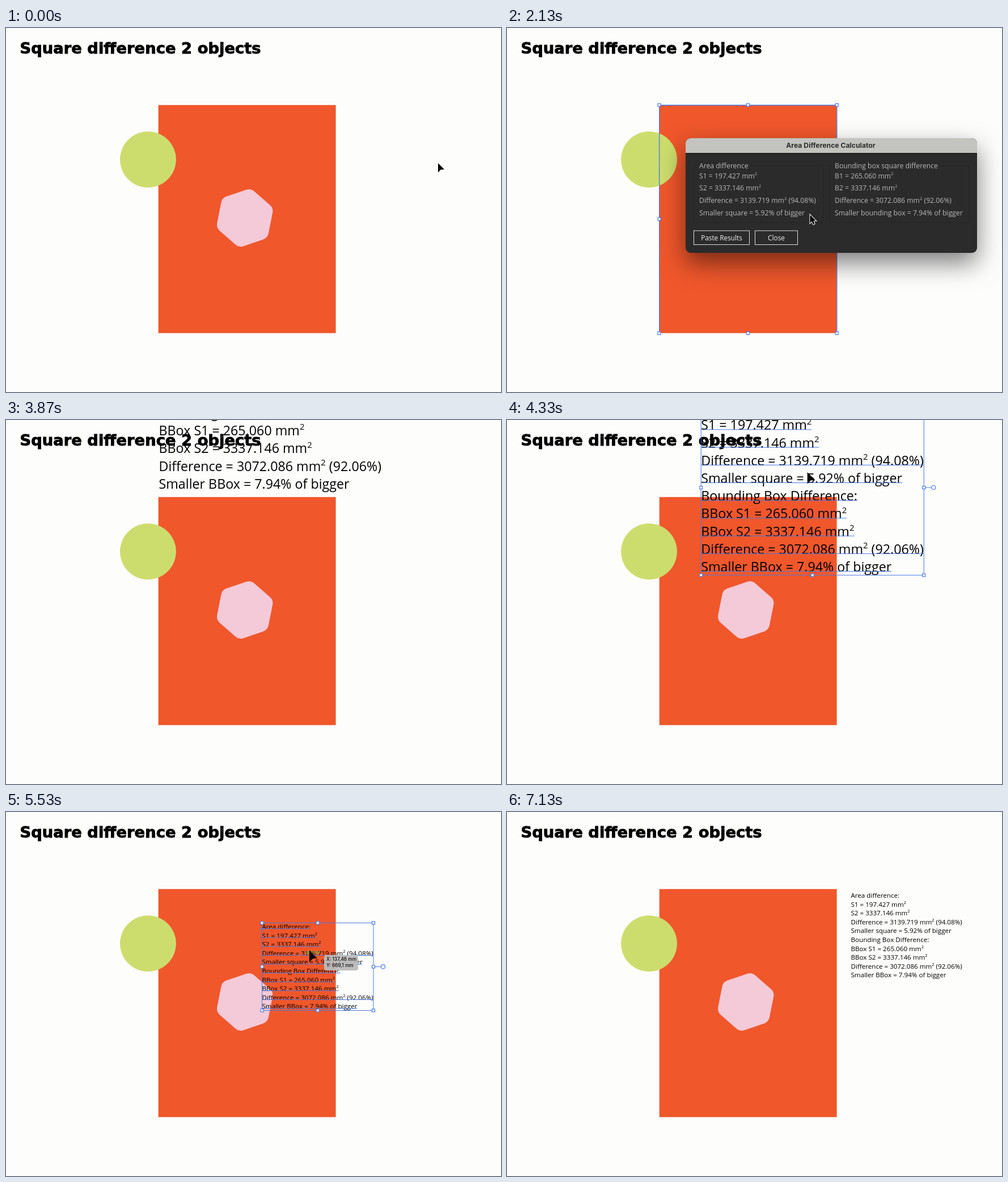
Recreate the animation shown at these times as an HTML page with a canvas. Size 873x641 px, loop 7270 ms.

```html
<!DOCTYPE html>
<html lang="en">
<head>
<meta charset="utf-8">
<title>Square difference 2 objects</title>
<style>
html, body { margin: 0; width: 100%; height: 100%; overflow: hidden; background: #fdfdfc; }
canvas { display: block; }
</style>
</head>
<body>
<canvas id="stage" width="873" height="641"></canvas>
<script>
const g = document.getElementById('stage').getContext('2d');
const LOOP = 7270, FPS = 15;
const BLUE = '#4a7ae6';
const BODY = '"Open Sans", "Noto Sans", sans-serif';
const UI = 'Inter, Roboto, sans-serif';

// pointer keys: time, x, y
const PATH = [
  [70, 762, 239], [470, 595, 529], [670, 595, 529], [1000, 415, 345],
  [1200, 415, 345], [1500, 640, 42], [1870, 742, 172], [1930, 742, 172],
  [2130, 534, 329], [2600, 402, 364], [3330, 402, 364], [3680, 682, 230],
  [3840, 600, -30], [4130, 457, -53], [4600, 639, 313], [4870, 639, 313],
  [5500, 535, 245], [5600, 535, 245], [6260, 690, 190]
];

const AREA = ['S1 = 197.427 mm²', 'S2 = 3337.146 mm²',
  'Difference = 3139.719 mm² (94.08%)', 'Smaller square = 5.92% of bigger'];
const BOUNDS = ['1 = 265.060 mm²', '2 = 3337.146 mm²', 'Difference = 3072.086 mm² (92.06%)'];
const REPORT = ['Area difference:', ...AREA, 'Bounding Box Difference:',
  'BBox S' + BOUNDS[0], 'BBox S' + BOUNDS[1], BOUNDS[2], 'Smaller BBox = 7.94% of bigger'];

const within = (t, a, b) => t >= a && t < b;

function pointer(t) {
  const i = PATH.findIndex(k => k[0] > t);
  if (i === 0) return PATH[0].slice(1);
  if (i < 0) return PATH[PATH.length - 1].slice(1);
  const [t0, x0, y0] = PATH[i - 1], [t1, x1, y1] = PATH[i];
  const p = (t - t0) / (t1 - t0), e = p * p * (3 - 2 * p);
  return [x0 + (x1 - x0) * e, y0 + (y1 - y0) * e];
}

function write(s, x, y, font, color, align = 'left') {
  g.font = font;
  g.fillStyle = color;
  g.textAlign = align;
  g.fillText(s, x, y);
}

// writes body text with a raised "²" and returns its width
function measureRow(s, x, y, size, color) {
  let end = x;
  for (const part of s.split(/(²)/)) {
    const raised = part === '²';
    write(raised ? '2' : part, end, y - (raised ? .42 * size : 0),
      `${raised ? .64 * size : size}px ${BODY}`, color);
    end += g.measureText(raised ? '2' : part).width;
  }
  return end - x;
}

function line(...pts) {
  g.beginPath();
  pts.forEach(([x, y]) => g.lineTo(x, y));
  g.stroke();
}

function pen(color, width = 1) {
  g.strokeStyle = color;
  g.lineWidth = width;
}

function panel(x, y, w, h, r, fill) {
  g.beginPath();
  g.roundRect(x, y, w, h, r);
  g.fillStyle = fill;
  g.fill();
}

function handles(x, y, w, h) {
  pen(BLUE, 1.2);
  g.fillStyle = '#fff';
  for (const i of [0, .5, 1]) for (const j of [0, .5, 1]) {
    if (i === .5 && j === .5) continue;
    const box = [x + w * i - 2.5, y + h * j - 2.5, 5, 5];
    g.fillRect(...box);
    g.strokeRect(...box);
  }
}

function hexagon() {
  const at = k => {
    const a = (-78.7 + 60 * k) * Math.PI / 180;
    return [421.2 + 53.4 * Math.cos(a), 334.5 + 53.4 * Math.sin(a)];
  };
  const [p, q] = [at(0), at(5)];
  g.beginPath();
  g.moveTo((p[0] + q[0]) / 2, (p[1] + q[1]) / 2);
  for (let k = 0; k < 6; k++) g.arcTo(...at(k), ...at(k + 1), 14.5);
  g.closePath();
}

function artwork(selected) {
  g.fillStyle = '#f0572b';
  g.fillRect(268.7, 135.7, 312.9, 401.6);
  g.fillStyle = '#cddd6d';
  g.beginPath();
  g.arc(250.5, 231.6, 49.4, 0, 7);
  g.fill();
  hexagon();
  g.fillStyle = '#f4c9d8';
  g.fill();
  if (!selected) return;
  pen(BLUE, 1.3);
  g.stroke();
  line([268.7, 537], [268.7, 136], [581.8, 136], [581.8, 537]);
  handles(268.5, 135.5, 313.3, 402);
}

function title() {
  const s = 'Square difference 2 objects';
  write(s, 24.4, 45.3, '700 27.4px "DejaVu Sans", sans-serif', '#000');
  pen('#000', .9);
  g.strokeText(s, 24.4, 45.3);
}

function report(x, y, s, selected) {
  REPORT.forEach((row, i) => {
    const base = y + i * 31.2 * s;
    const width = measureRow(row, x, base, 23.24 * s, '#000');
    if (!selected) return;
    pen(BLUE);
    line([x, base - .5], [x + width, base - .5]);
  });
  if (!selected) return;
  const top = y - 21.5 * s, w = 393 * s, h = 308.5 * s, mid = top + h / 2;
  pen(BLUE);
  g.strokeRect(x, top, w, h);
  line([x + w, mid], [x + w + 13.5, mid]);
  handles(x, top, w, h);
  g.fillStyle = BLUE;
  g.fillRect(x - 2, y - 2, 4, 4);
  g.beginPath();
  g.arc(x + w + 17, mid, 3.5, 0, 7);
  g.fillStyle = '#fff';
  g.fill();
  g.stroke();
}

function group(x, w, label, rows) {
  const size = 12.2, ink = '#b9b9b9';
  pen('#232323');
  g.strokeRect(x + .5, 242.5, w, 100);
  g.font = `${size}px ${BODY}`;
  g.fillStyle = '#2b2b2b';
  g.fillRect(x + 6, 238, g.measureText(label).width + 8, 8);
  measureRow(label, x + 10, 246.5, size, ink);
  rows.forEach((row, i) => measureRow(row, x + 10, 264.5 + i * 21.7, size, ink));
}

function button(x, w, label, pressed) {
  if (pressed) {
    g.fillStyle = '#3b96f2';
    g.fillRect(x, 356.5, w, 25.5);
  } else {
    pen('#dedede');
    g.strokeRect(x + .5, 357, w - 1, 24.5);
  }
  write(label, x + w / 2, 374, `11.8px ${BODY}`, '#f2f2f2', 'center');
}

function dialog(pressed) {
  g.save();
  g.shadowColor = 'rgba(0,0,0,.5)';
  g.shadowBlur = 44;
  g.shadowOffsetY = 18;
  panel(315, 194, 514, 202, 9, '#2b2b2b');
  g.restore();
  panel(315, 194, 514, 26, [9, 9, 0, 0], '#c3c4bf');
  g.fillStyle = '#111';
  g.fillRect(315, 220, 514, 1);
  write('Area Difference Calculator', 571, 211.3, `700 12.2px ${UI}`, '#2d2d2d', 'center');
  group(329, 228, 'Area difference', AREA);
  group(568, 246, 'Bounding box square difference',
    ['B' + BOUNDS[0], 'B' + BOUNDS[1], BOUNDS[2], 'Smaller bounding box = 7.94% of bigger']);
  button(329, 99, 'Paste Results', pressed);
  button(437, 76, 'Close', false);
}

function hint(x, y, mmX, mmY) {
  const font = `500 8.3px ${UI}`;
  write('anchor', x + 5, y + 1, `8px ${UI}`, '#45d445');
  panel(x + 38, y + 3, 60, 27, 4, 'rgba(188,188,188,.95)');
  write(`X: ${mmX} mm`, x + 42, y + 13.3, font, '#111');
  write(`Y: ${mmY} mm`, x + 42, y + 24.3, font, '#111');
}

function shape(x, y, s, pts) {
  g.beginPath();
  pts.forEach(([a, b]) => g.lineTo(x + a * s, y + b * s));
  g.closePath();
}

function arrow(x, y, s) {
  shape(x, y, s, [[0, -1], [0, 15.5], [4.6, 10.6], [11, 10]]);
  g.fillStyle = '#000';
  g.fill();
}

function systemArrow(x, y) {
  shape(x, y, 1, [[.5, 0], [.5, 14.5], [3.8, 11.5], [6, 16.8], [8.6, 15.7], [6.4, 10.6], [10.8, 10.6]]);
  pen('#fff', 2);
  g.stroke();
  g.fillStyle = '#000';
  g.fill();
}

function draw(t) {
  const [x, y] = pointer(t);
  const modal = within(t, 1600, 3270);
  g.fillStyle = '#fdfdfc';
  g.fillRect(0, 0, 873, 641);
  artwork(within(t, 990, 3660));
  title();

  if (t >= 3270) {
    let pos = [269.5, -160];
    if (t >= 5600) pos = [x - 83.5, y - 39];
    else if (t >= 4600) pos = [451.5, 206];
    else if (t >= 4130) pos = [x - 187.5, y - 107];
    report(...pos, t < 5200 ? 1 : .5, within(t, 4130, 6470));
  }

  if (within(t, 670, 990)) {
    pen('#8a8a8a');
    g.strokeRect(595.5, 529.5, x - 595, y - 529);
  }
  if (modal) dialog(t >= 3060);

  if (within(t, 4650, 4870)) {
    hint(640, 311, '156,57', '679,18');
    pen('#000');
    g.setLineDash([2, 2]);
    g.strokeRect(x + 8, y + 15.5, 9, 9);
    g.setLineDash([]);
  }
  if (within(t, 5460, 5600)) hint(523, 249, '137,46', '669,1');

  if (modal) systemArrow(x, y);
  else if (t < 6660) arrow(x, y, t < 3270 ? 1 : 1.25);
}

const start = performance.now();
function tick() {
  const t = (performance.now() - start) % LOOP;
  draw(Math.floor(t * FPS / 1000 + .1) * 1000 / FPS);
  requestAnimationFrame(tick);
}
tick();
</script>
</body>
</html>
```
